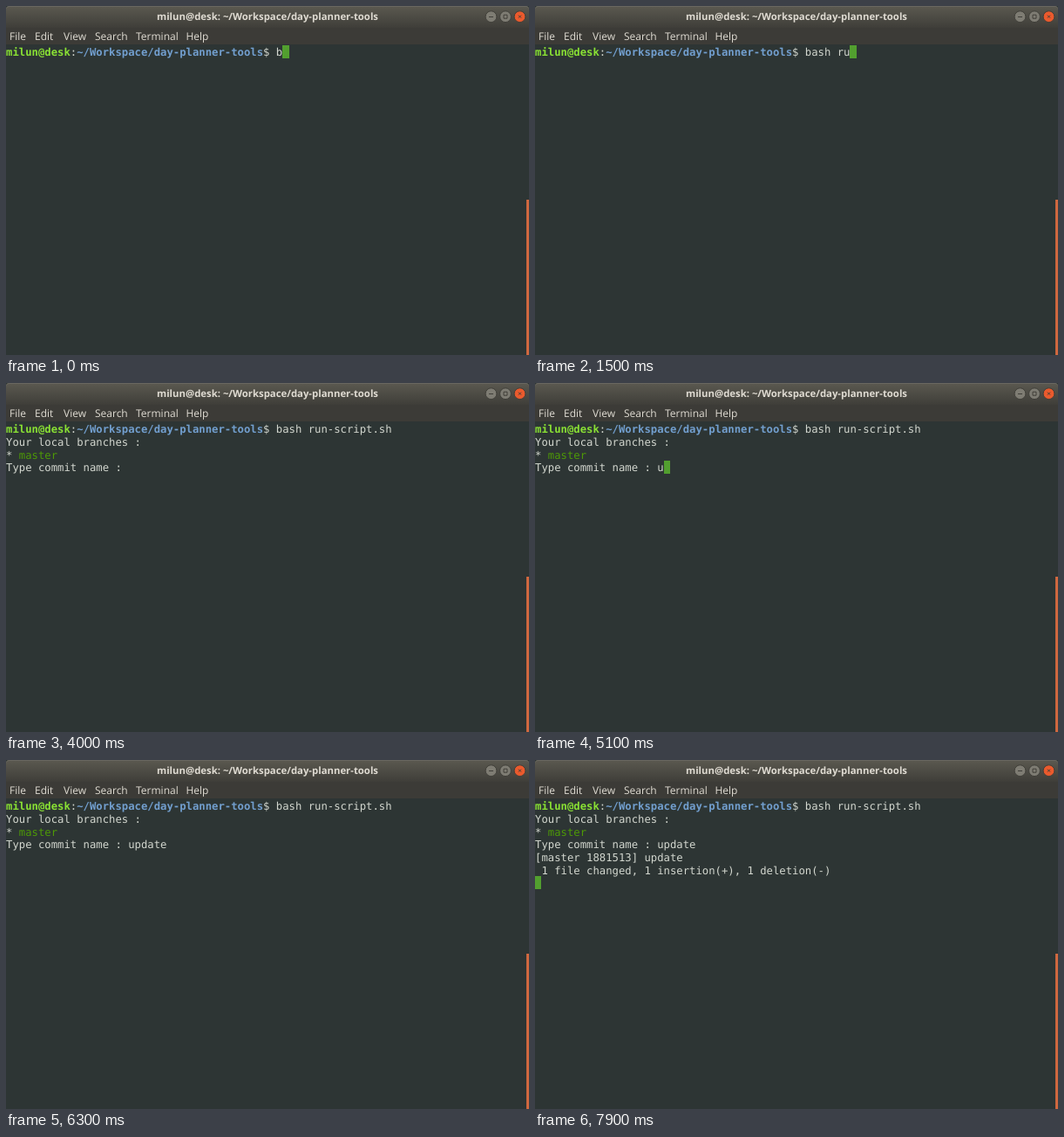
Write an HTML page that moves like this. It is 600 by 400 pixels and loops after 8 s.

```html
<!DOCTYPE html>
<html lang="en">
<head>
<meta charset="utf-8">
<title>Terminal</title>
<style>
  html, body { margin: 0; width: 100%; height: 100%; overflow: hidden; background: #2d3534; }
  #stage { position: relative; width: 600px; height: 400px; overflow: hidden; text-rendering: geometricPrecision; }
  #stage > * { position: absolute; }
  #bar { width: 600px; height: 25px; background: linear-gradient(#5b5950, #3f3e39);
    border-radius: 4px 4px 0 0; box-shadow: inset 0 1px #696760; color: #dfdbd2; text-align: center;
    font: 700 11.35px/26px "Open Sans", sans-serif; }
  #menu { top: 25px; width: 600px; height: 19px; background: #3c3b37; color: #dfdbd2;
    font: 12px/20px "Open Sans", sans-serif; }
  #menu span { position: absolute; }
  #buttons { left: 548px; top: 3px; }
  #scroll { left: 597px; top: 222px; width: 3px; height: 178px; background: #d0683f; }
  #text { left: 0; top: 46.3px; margin: 0; color: #d3d7cf; white-space: pre;
    font: 12.25px/14.67px "DejaVu Sans Mono", monospace; }
  #cursor { width: 7.4px; height: 14.67px; background: #529f2f; }
  b.user { color: #8ae234; }
  b.path { color: #729fcf; }
  i { color: #4e9a06; font-style: normal; }
</style>
</head>
<body>
<div id="stage">
  <div id="bar">milun@desk: ~/Workspace/day-planner-tools</div>
  <svg id="buttons" width="52" height="18" stroke="#403f39" fill="#7e7c73">
    <circle cx="8.5" cy="9.2" r="6.4"/>
    <circle cx="25" cy="9.2" r="6.4"/>
    <circle cx="41.5" cy="9.2" r="6.4" fill="#ea5a2d"/>
    <path d="M6 9.5h5M23 7.2h4v4h-4zM40 7.7l3 3m0-3l-3 3" fill="none"/>
  </svg>
  <div id="menu">
    <span style="left:4px">File</span>
    <span style="left:33px">Edit</span>
    <span style="left:66px">View</span>
    <span style="left:102px">Search</span>
    <span style="left:149px">Terminal</span>
    <span style="left:206.5px">Help</span>
  </div>
  <div id="scroll"></div>
  <div id="cursor"></div>
  <pre id="text"></pre>
</div>
<script>
const LOOP = 8000, CELL = 7.377, ROW = 14.67, TOP = 45.3;
const text = document.getElementById('text');
const cursor = document.getElementById('cursor');

const prompt = '<b class="user">milun@desk</b>:<b class="path">~/Workspace/day-planner-tools</b>$ ';
const command = 'bash run-script.sh ';
const message = 'update';
const commandKeys = [0, 200, 300, 400, 500, 1400, 1500, 1800];
const messageKeys = [5100, 5200, 5300, 5400, 5600, 5700];
const hidden = [[1100, 1400], [2600, 3200], [4000, 4600], [6300, 6700], [7300, 7900]];

const typed = (word, keys, t) => word.slice(0, keys.filter(k => k <= t).length);

function linesAt(t) {
  // the rest of the command is completed at once
  const lines = [prompt + (t < 2100 ? typed(command, commandKeys, t) : command)];
  if (t >= 3500) {
    lines.push('Your local branches :', '* <i>master</i>',
      'Type commit name : ' + typed(message, messageKeys, t));
  } else if (t >= 3400) lines.push('');
  if (t >= 6800) {
    lines.push('[master 1881513] update', ' 1 file changed, 1 insertion(+), 1 deletion(-)', '');
  } else if (t >= 6700) lines.push('');
  return lines;
}

function draw(now) {
  const t = now % LOOP;
  const lines = linesAt(t);
  const html = lines.join('\n');
  if (draw.last !== html) text.innerHTML = draw.last = html;

  const row = lines.length - 1;
  const col = lines[row].replace(/<[^>]*>/g, '').length;
  cursor.style.left = col * CELL + 'px';
  cursor.style.top = TOP + row * ROW + 'px';
  cursor.style.opacity = hidden.some(([a, b]) => t >= a && t < b) ? 0 : 1;
}

const start = performance.now();
function frame() {
  draw(performance.now() - start);
  requestAnimationFrame(frame);
}
frame();
</script>
</body>
</html>
```
